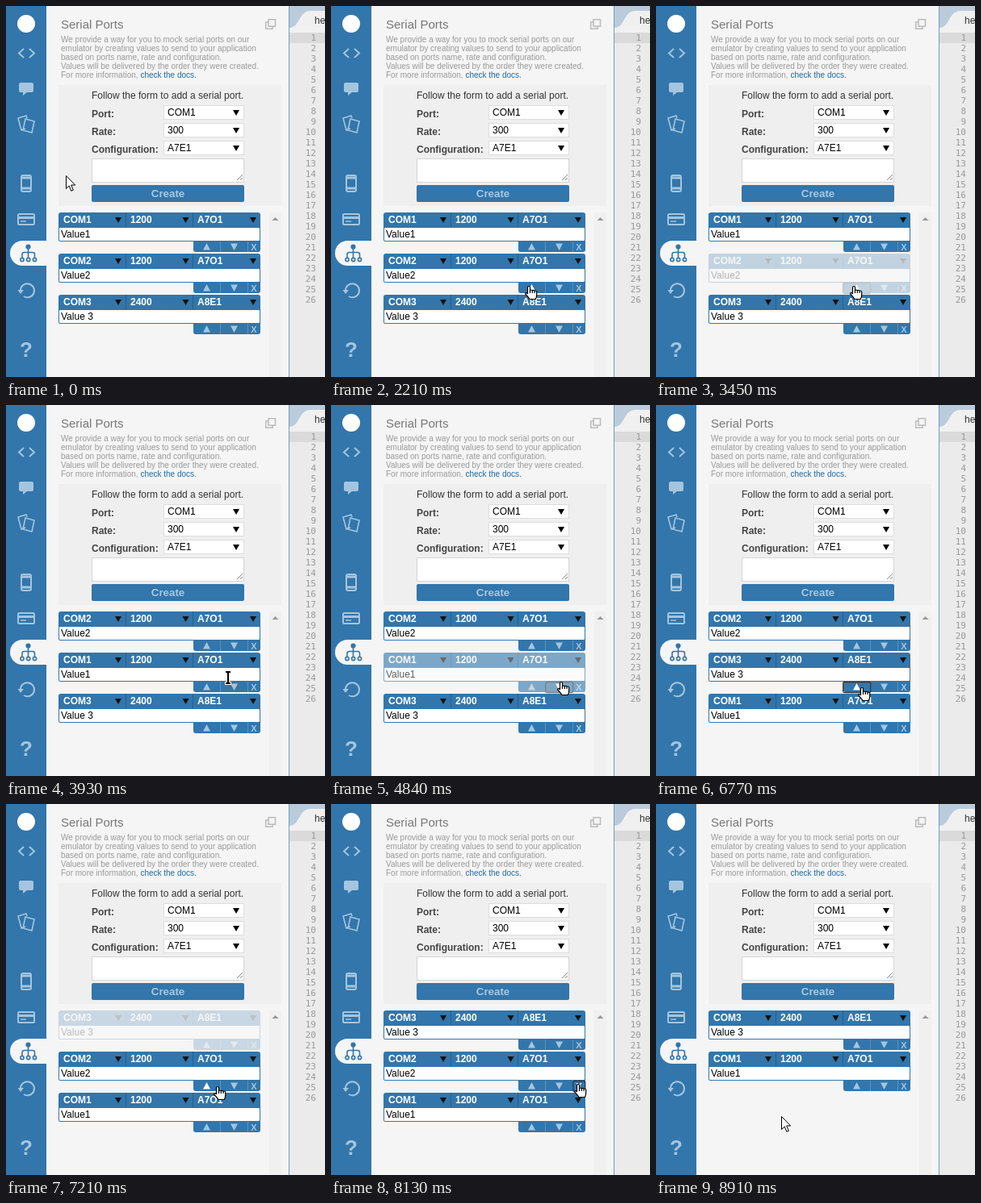
Recreate the animation shown at these times as an HTML page. Size 395 by 460 pixels, loop 9.33 s.

```html
<!DOCTYPE html>
<html lang="en">
<head>
<meta charset="utf-8">
<title>Serial Ports</title>
<style>
  html, body { margin: 0; width: 100%; height: 100%; overflow: hidden; background: #f5f5f5; }
  svg { display: block; font: 12px "Liberation Sans", Arial, sans-serif; }
  .bold { font-weight: bold; }
  .icon { fill: none; stroke: #a5c5de; stroke-width: 2; }
  .button { fill: #a5c5de; }
  .button.hover { fill: #fff; }
  #lines { font: 11px "DejaVu Sans Mono", monospace; fill: #999; text-anchor: end; }
</style>
</head>
<body>
<svg width="395" height="460" viewBox="0 0 395 460">
  <rect width="395" height="460" fill="#f5f5f5"/>

  <!-- Sidebar -->
  <rect width="50" height="460" fill="#3276ab"/>
  <circle cx="25" cy="22" r="11" fill="#fff"/>
  <g class="icon">
    <path d="M22 53L16 58.500L22 64M29 53L35 58.500L29 64"/>
    <path d="M18 95H32Q34 95 34 97V105Q34 107 32 107H26L21 111V107H18Q16 107 16 105V97Q16 95 18 95Z" fill="#a5c5de" stroke="none"/>
    <g stroke-width="1.600">
      <path d="M24 152L19 154L15 139L25 136L26 139"/>
      <path d="M24 140L35 143L32 157L21 154Z"/>
    </g>
    <rect x="19" y="210" width="12" height="20" rx="2"/>
    <path d="M19 213H31M19 226H31" stroke-width="3"/>
    <rect x="15" y="258" width="20" height="13" rx="1.500"/>
    <path d="M15 262.500H35" stroke-width="3"/>
    <path d="M18 267H25" stroke-width="1.500"/>
    <path d="M18 353A8.500 8.500 0 1 1 22 360"/>
    <path d="M14.500 352H22L18 357Z" fill="#a5c5de" stroke="none"/>
  </g>
  <text x="25" y="435" font-size="26" class="bold" text-anchor="middle" fill="#a5c5de">?</text>
  <path d="M50 291H20.500a15.500 15.500 0 0 0 0 31H50Z" fill="#f5f5f5"/>
  <g fill="none" stroke="#3276ab" stroke-width="1.600">
    <path d="M27.500 300V312M20 312V308Q20 305.500 22.500 305.500H33Q35.500 305.500 35.500 308V312"/>
    <circle cx="27.500" cy="298.500" r="2.300" fill="#3276ab"/>
    <circle cx="20" cy="314.500" r="2.100"/><circle cx="27.700" cy="314.500" r="2.100"/><circle cx="35.500" cy="314.500" r="2.100"/>
  </g>

  <!-- Heading -->
  <text x="68" y="28" font-size="15" fill="#777">Serial Ports</text>
  <g fill="none" stroke="#bbb" stroke-width="1.500">
    <rect x="325" y="16.700" width="8.500" height="8.500"/>
    <path d="M325 20H321.700V28.300H330V25"/>
  </g>
  <g id="intro" font-size="10" fill="#999"></g>

  <!-- Form -->
  <rect x="65" y="98" width="276" height="150" fill="#efefef"/>
  <text x="106" y="115" fill="#333">Follow the form to add a serial port.</text>
  <g id="fields"></g>
  <rect x="106.500" y="189.500" width="188" height="29" fill="#fff" stroke="#d5d5d5"/>
  <path d="M286 216L293 209M290 216L293 213" stroke="#888"/>
  <rect x="106" y="222" width="189" height="21" rx="2" fill="#3276ab"/>
  <text x="200.500" y="237" font-size="13.333" class="bold" text-anchor="middle" fill="#a9c8e0">Create</text>

  <!-- List -->
  <rect x="326" y="256" width="15" height="204" fill="#f0f0f0"/>
  <path d="M329.500 266H337.500L333.500 262Z" fill="#999"/>
  <g id="rows"></g>

  <!-- Editor -->
  <rect x="351" width="44" height="33" fill="#bacbdc"/>
  <path d="M351 33V27C364 27 362 6 377 6H395V33Z" fill="#f0f0f0"/>
  <text x="382" y="22" fill="#333">hello</text>
  <rect x="351" y="33" width="44" height="427" fill="#ebebeb"/>
  <rect x="351" y="33" width="44" height="13" fill="#dadada"/>
  <rect x="350" width="1" height="460" fill="#6e9dc3"/>
  <g id="lines"></g>

  <!-- Pointers, with the hot spot at 0,0 -->
  <g id="pointer">
    <path id="arrow" d="M.5 .5V16.500L4.200 13L6.800 19.300L9.300 18.200L6.700 12H11.700Z" fill="#fff" stroke="#000"/>
    <g id="beam" fill="none">
      <path d="M-4 -7H4M0 -7V7M-4 7H4" stroke="#fff" stroke-width="4"/>
      <path d="M-3 -7H3M0 -7V7M-3 7H3" stroke="#000" stroke-width="2"/>
    </g>
    <path id="hand" transform="translate(-5 0)" fill="#fff" stroke="#000" stroke-width="1.200"
      d="M3.500 10V2a1.500 1.500 0 0 1 3 0V6q0-1 1.300-1t1.500 1.200q.2-.8 1.400-.8t1.400 1.200q.3-.6 1.300-.6t1.300 1.500V11q0 3-1.500 5.500H6Q4.500 14 1 10.500Q.3 9 1.500 8.600T3.500 10ZM6.500 6V9M9.300 6.200V9M12.100 6.600V9"/>
  </g>
</svg>
<script>
const LOOP = 9330;
const SLOT_TOP = 256, SLOT_STEP = 51;
const byId = id => document.getElementById(id);
const downTriangle = (x, y, color) => `<path d="M${x} ${y}h8l-4 7z" fill="${color}"/>`;

byId('intro').innerHTML = [
  'We provide a way for you to mock serial ports on our',
  'emulator by creating values to send to your application',
  'based on ports name, rate and configuration.',
  'Values will be delivered by the order they were created.',
  'For more information, <tspan fill="#1d6ba6">check the docs.</tspan>'
].map((line, i) => `<text x="68" y="${45 + i * 11}">${line}</text>`).join('');

byId('fields').innerHTML = [['Port:', 'COM1'], ['Rate:', '300'], ['Configuration:', 'A7E1']]
  .map(([label, value], i) => {
    const y = 123 + i * 22;
    return `<text x="106" y="${y + 15}" class="bold" fill="#444">${label}</text>
      <rect x="195.500" y="${y + .5}" width="99" height="17" fill="#fff" stroke="#ddd"/>
      <text x="200" y="${y + 13}">${value}</text>${downTriangle(281, y + 6, '#000')}`;
  }).join('');

byId('lines').innerHTML = Array.from({ length: 26 }, (_, i) =>
  `<text x="384" y="${43 + i * 13}">${i + 1}</text>`).join('');

byId('rows').innerHTML = [
  ['COM1', '1200', 'A7O1', 'Value1'],
  ['COM2', '1200', 'A7O1', 'Value2'],
  ['COM3', '2400', 'A8E1', 'Value 3']
].map(([port, rate, config, value]) => `<g>
    <path d="M65 36V3q0-3 3-3H312q3 0 3 3V46q0 3-3 3H235q-3 0-3-3V36H67Q65 36 65 34Z" fill="#3276ab"/>
    <rect x="66" y="19" width="248" height="16" rx="1" fill="#fff"/>
    <path d="M148.500 0V18M231.500 0V18" stroke="#265f8d"/>
    <path d="M265.500 36V49M299.500 36V49" stroke="#5b92be"/>
    ${[port, rate, config].map((text, i) =>
      `<text x="${71 + i * 83}" y="13" class="bold" fill="#fff">${text}</text>` +
      downTriangle(135 + i * 83.5, 6, '#111')).join('')}
    <text x="68" y="31">${value}</text>
    <path class="button" d="M244 46.500H253L248.500 38Z"/>
    <path class="button" d="M278 38.500H287L282.500 47Z"/>
    <text class="button bold" x="307" y="47" font-size="11" text-anchor="middle">X</text>
    <rect class="ring" y="36.500" height="13" rx="1.500" fill="none" stroke="#30373d" stroke-width="1.300"/>
  </g>`).join('');

const rows = [...byId('rows').children].map(node => ({
  node,
  buttons: [...node.querySelectorAll('.button')],
  ring: node.querySelector('.ring')
}));

// A press fades its row out, reorders the list, then fades the row back in.
const actions = [
  { row: 1, button: 0, press: 3100, out: 3220, swap: 3570, end: 3920, order: [1, 0, 2] },
  { row: 0, button: 1, press: 4580, out: 4700, swap: 5030, end: 5390, order: [1, 2, 0] },
  { row: 2, button: 0, press: 6600, out: 6750, swap: 7100, end: 7450, order: [2, 1, 0] },
  { row: 1, button: 2, press: 8000, out: 8110, swap: 8480, end: 8481, order: [2, 0] }
];

// Pointer stops: time, x, y
const stops = [
  [0, 74, 210], [1120, 74, 210], [2090, 244, 343], [2170, 244, 348], [2210, 245, 347],
  [3600, 245, 347], [3930, 275, 338], [4170, 285, 343], [5630, 285, 343],
  [6060, 250, 351], [6190, 255, 350], [7120, 255, 350], [7510, 310, 347],
  [7550, 312, 347], [7809, 312, 347], [7810, 306, 347], [8260, 306, 347],
  [8730, 158, 381], [8909, 158, 381], [8910, 155, 387], [LOOP, 155, 387]
];

const edges = [232, 266, 300, 315];
const clamp = v => Math.min(1, Math.max(0, v));
const swing = (t, from, to) => .5 - Math.cos(Math.PI * clamp((t - from) / (to - from))) / 2;

function pointerAt(t) {
  const i = stops.findIndex(stop => stop[0] > t);
  const [t0, x0, y0] = stops[i - 1], [t1, x1, y1] = stops[i];
  const k = swing(t, t0, t1);
  return [Math.round(x0 + (x1 - x0) * k), Math.round(y0 + (y1 - y0) * k)];
}

function draw(t) {
  const [x, y] = pointerAt(t);
  const order = actions.reduce((now, a) => t >= a.swap ? a.order : now, [0, 1, 2]);
  let shape = x >= 106 && x < 295 && y >= 222 && y < 243 ? 'hand' : 'arrow';

  rows.forEach(({ node, buttons, ring }, id) => {
    const slot = order.indexOf(id);
    node.style.display = slot < 0 ? 'none' : '';
    if (slot < 0) return;
    const top = SLOT_TOP + slot * SLOT_STEP;
    const dy = y - top;
    const hovered = dy >= 36 && dy < 49 ? edges.findIndex((e, i) => x >= e && x < edges[i + 1]) : -1;
    if (hovered >= 0) shape = 'hand';
    if (dy >= 19 && dy < 35 && x >= 66 && x < 314) shape = 'beam';

    const action = actions.find(a => a.row === id && t >= a.press && t < a.end);
    const opacity = !action ? 1
      : t < action.swap ? 1 - swing(t, action.out, action.swap)
      : swing(t, action.swap, action.end);
    const pressed = action && t < action.swap ? action.button : -1;

    node.setAttribute('transform', `translate(0 ${top})`);
    node.setAttribute('opacity', opacity);
    buttons.forEach((button, i) => button.classList.toggle('hover', i === hovered));
    ring.style.display = pressed < 0 ? 'none' : '';
    if (pressed >= 0) {
      ring.setAttribute('x', edges[pressed] - .3);
      ring.setAttribute('width', edges[pressed + 1] - edges[pressed]);
    }
  });

  byId('pointer').setAttribute('transform', `translate(${x} ${y})`);
  for (const id of ['arrow', 'beam', 'hand']) byId(id).style.display = id === shape ? '' : 'none';
}

const start = performance.now();
function tick() {
  draw((performance.now() - start) % LOOP);
  requestAnimationFrame(tick);
}
tick();
</script>
</body>
</html>
```
